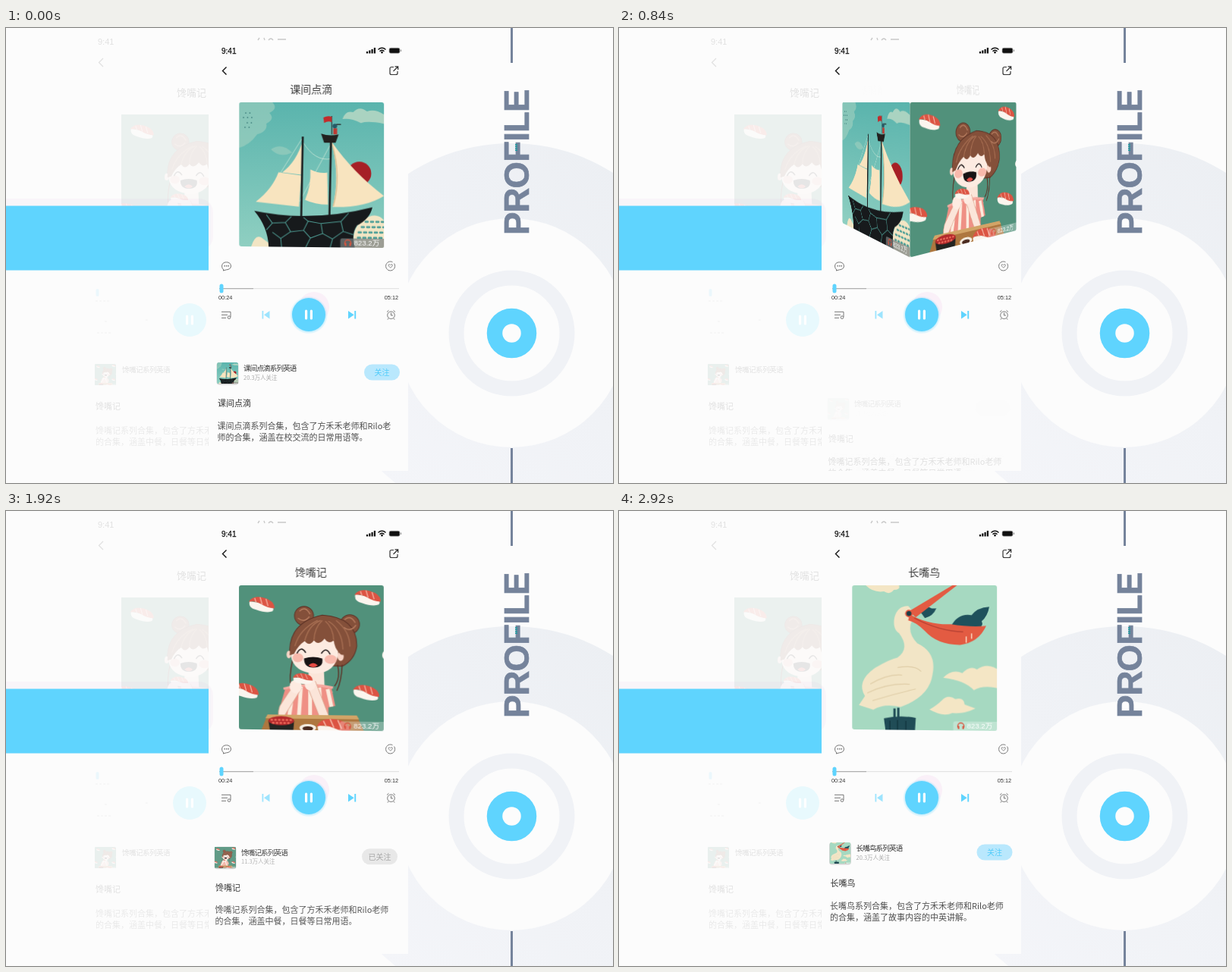
An HTML page that plays this animation: 800x600 px, repeating every 2960 ms.

```html
<!DOCTYPE html>
<html lang="zh-CN">
<head>
<meta charset="utf-8">
<title>Player</title>
<style>
  html, body { margin: 0; width: 100%; height: 100%; overflow: hidden; background: #fcfcfc; }
  #stage { position: relative; width: 800px; height: 600px; overflow: hidden; }
  #scene { position: absolute; left: 0; top: 0; }
  text, .title { font-family: "Noto Sans CJK SC", "Noto Sans CJK", "Noto Sans", sans-serif; }
  .latin { font-family: "Liberation Sans", Arial, sans-serif; }
  #cube { position: absolute; inset: 0; perspective: 573px; perspective-origin: 405px 99px; }
  .face { position: absolute; left: 309.5px; top: 98px; width: 191px; height: 191px; backface-visibility: hidden; }
  .face svg { display: block; border-radius: 3px; }
  .title { position: absolute; top: -26px; width: 100%; text-align: center; font-size: 14px; line-height: 17px; font-weight: 400; color: #3c3c3c; }
  .thumb { clip-path: inset(0 round 3px); }
</style>
</head>
<body>
<div id="stage">
<svg id="scene" width="800" height="600" viewBox="0 0 800 600">
  <defs>
    <linearGradient id="disc" x1="1" y1="0" x2="0" y2="1">
      <stop offset="0" stop-color="#ebeef2"/><stop offset="1" stop-color="#f5f6fa"/>
    </linearGradient>
    <linearGradient id="sky" x1="0" y1="0" x2="0" y2="1">
      <stop offset="0" stop-color="#5ab4ad"/><stop offset="1" stop-color="#8fcfc1"/>
    </linearGradient>
    <radialGradient id="glow"><stop offset=".85" stop-color="#5fd4fe" stop-opacity=".4"/><stop offset="1" stop-color="#5fd4fe" stop-opacity="0"/></radialGradient>
    <clipPath id="leftClip"><rect width="267" height="600"/></clipPath>
    <clipPath id="phoneClip"><rect x="267" width="263" height="584"/></clipPath>

    <g id="tag">
      <path d="M133 190V181Q133 178 136 178H190V190Z" fill="#fff" opacity=".28"/>
      <path d="M139 186V184A4 4 0 0 1 147 184V186" fill="none" stroke="#d9553f" stroke-width="1.4"/>
      <path d="M139 184h2v4h-2zM145 184h2v4h-2z" fill="#d9553f"/>
      <text x="151" y="187.5" font-size="9.5" fill="#fff" class="latin">823.2万</text>
    </g>
    <g id="sushi">
      <path d="M-16 0Q-17 9-6 10Q9 13 16 9Q19 4 10 1Z" fill="#fbf5ee"/>
      <path d="M-17 1Q-13-9 2-7T18 5Q9 6 0 2T-17 1Z" fill="#dc5443"/>
      <path d="M-10-5l3 6M-3-7l4 9M5-6l4 9" stroke="#f6b9a8" stroke-width="1.2" fill="none"/>
    </g>
    <g id="pause"><circle r="22"/><path d="M-3.4-5V5M3.4-5V5" stroke="#fff" stroke-width="3.2" stroke-linecap="round"/></g>

    <symbol id="art0" viewBox="0 0 190 190">
      <rect width="190" height="190" fill="url(#sky)"/>
      <g fill="#aad3c1">
        <path d="M0 0H44Q52 8 40 14Q48 22 36 28Q38 38 24 42Q14 56 0 60Z" opacity=".55"/>
        <path d="M136 22Q140 10 150 13Q158 4 168 12Q178 8 190 16V28Q170 24 160 27Q146 20 136 22Z"/>
        <path d="M42 62Q56 52 70 66Q54 74 42 62Z" opacity=".5"/>
      </g>
      <path d="M8 14h9M5 20h14M10 27h10M7 33h8" stroke="#2b6d6d" stroke-width="1.2" stroke-dasharray="1.5 4"/>
      <circle cx="158" cy="93" r="15.5" fill="#a61f26"/>
      <path d="M84 52Q100 78 121 74M84 46L40 116M121 54L80 130" fill="none" stroke="#cfe9d8" stroke-width=".7"/>
      <g fill="#f8e4bf">
        <path d="M84 50Q76 78 57 92L82 95Z"/>
        <path d="M52 92L82 96L79 137L22 131Q44 114 52 92Z"/>
        <path d="M94 88Q106 94 116 92L117 134Q100 134 87 128Q95 110 94 88Z"/>
        <path d="M122 52Q150 92 190 122Q165 138 123 137Q133 100 122 52Z"/>
      </g>
      <path d="M122 53Q135 96 124 136" stroke="#d8bf94" stroke-width="1.5" fill="none"/>
      <g fill="#f2e5c4">
        <path d="M152 190Q146 166 164 153Q180 142 190 154V190Z"/>
        <path d="M16 190Q22 171 32 180L46 190Z"/>
      </g>
      <path d="M166 156H190M161 163H190M157 170H190M156 177H190" stroke="#4d9f98" stroke-width="2.6" stroke-dasharray="3 4" stroke-linecap="round"/>
      <path d="M84 45L82 150M121 50L119 148" stroke="#1b1d1e" stroke-width="2.6"/>
      <path d="M20 143Q96 158 175 137Q172 152 155 161Q147 172 152 190H39Q38 164 20 143Z" fill="#171a1c"/>
      <path d="M36 148l8 11l-8 9M44 159l17-1l8-8M61 158l7 12l-13 9l-11-8M68 170l17-2l6-12l-6-5M85 168l9 10l-6 12M94 178l16-6l-2-13l-17-3M110 172l13 7l-3 11M123 179l14-10l-3-13l-26 3M134 156l10-11M137 169l13 4M55 179l1 11" fill="none" stroke="#4f9f96" stroke-width="1"/>
      <path d="M108 41Q119 45 131 42L127 53H112Z" fill="#22211f"/>
      <path d="M122 18V42" stroke="#26282a"/>
      <path d="M111 20Q117 17 122 19V26Q117 24 112 27Z" fill="#c22c2b"/>
      <circle cx="126" cy="31" r="3" fill="#245a68"/><path d="M124 34h5v8h-5z" fill="#bd3932"/><path d="M128 29h6" stroke="#222" stroke-width="1.3"/>
      <rect x="134" y="178" width="56" height="12" fill="#26302f" opacity=".6"/>
      <use href="#tag"/>
    </symbol>

    <symbol id="art1" viewBox="0 0 190 190">
      <rect width="190" height="190" fill="#51917b"/>
      <use href="#sushi" transform="translate(30 23) rotate(8)"/>
      <use href="#sushi" transform="translate(169 14) rotate(8)"/>
      <use href="#sushi" transform="translate(9 137) rotate(8)"/>
      <use href="#sushi" transform="translate(167 138) rotate(8)"/>
      <ellipse cx="191" cy="91" rx="3" ry="5" fill="#fbf5ee"/>
      <g fill="#84503a" stroke="#5b3024">
        <circle cx="86" cy="40" r="12.5"/><circle cx="146" cy="51" r="12.5"/>
        <path d="M67 86Q68 48 110 39Q156 42 155 80Q152 98 136 106L80 104Z"/>
      </g>
      <path d="M80 34q8-8 14 4M78 43q8 7 15-2M139 45q8-7 14 4M138 55q9 7 16-3" fill="none" stroke="#b57b5e" stroke-width="1.5"/>
      <path d="M71 98Q66 120 69 134M130 104Q134 122 126 132M136 104Q135 126 129 138" fill="none" stroke="#5b3024" stroke-width="1.4"/>
      <path d="M92 108H112L113 134L124 140L112 150H82L73 138L92 132Z" fill="#fbe5d9"/>
      <path d="M69 88Q74 62 99 64Q130 64 131 90Q127 114 101 116Q73 114 69 94Z" fill="#fdebe1"/>
      <ellipse cx="66" cy="91" rx="3" ry="5" fill="#f8d5c7"/><ellipse cx="134" cy="93" rx="4" ry="6" fill="#f8d5c7"/>
      <path d="M67 92Q68 52 106 44Q150 46 143 90Q134 93 132 88Q126 82 125 72Q118 78 113 70Q105 80 99 72Q93 81 87 73Q78 79 73 90Z" fill="#84503a"/>
      <path d="M108 46Q92 52 87 73M110 46Q100 55 99 72M114 47Q124 55 125 72M118 47Q136 58 137 84M104 46Q80 58 74 80M128 46Q146 60 146 80" fill="none" stroke="#a66d51" stroke-width="1.4"/>
      <ellipse cx="78" cy="95" rx="7" ry="6" fill="#f7a89b" opacity=".75"/><ellipse cx="121" cy="97" rx="8" ry="6" fill="#f7a89b" opacity=".75"/>
      <path d="M77 89Q82 79 88 88M109 89Q115 80 120 90" fill="none" stroke="#272020" stroke-width="1.6" stroke-linecap="round"/>
      <path d="M86 96Q98 92 110 96Q112 108 98 108Q86 108 86 96Z" fill="#171314"/><path d="M92 105Q98 99 104 105Q98 110 92 105Z" fill="#e34b45"/>
      <path d="M61 137Q90 126 122 134L127 158L118 160V176H58L55 158Z" fill="#ef9085"/>
      <path d="M72 134L66 176M82 133L79 176M94 132V176M106 134L109 176M117 136L122 159" stroke="#fcebdd" stroke-width="5"/>
      <path d="M59 136Q90 127 124 134" stroke="#f6aaa0" stroke-width="3" fill="none"/>
      <path d="M54 159Q50 171 55 180L83 135L75 128Q66 140 54 159ZM91 134L109 179L120 175L101 126Z" fill="#fbe5d9" stroke="#d89c84" stroke-width=".8"/>
      <ellipse cx="75" cy="133" rx="8" ry="9" fill="#fdebe1"/><ellipse cx="94" cy="130" rx="7" ry="8" fill="#fdebe1"/>
      <use href="#sushi" transform="translate(84 121) scale(.75)"/>
      <path d="M30 190L38 170H155L164 190Z" fill="#ae773f"/><path d="M38 170H155L158 175H35Z" fill="#d2a467"/>
      <path d="M39 178H73L72 190H41Z" fill="#242522"/><ellipse cx="56" cy="178" rx="17" ry="6" fill="#b3292b"/>
      <path d="M43 177H70M45 181H67" stroke="#ee6b5b" stroke-width="2.5" stroke-dasharray="1 4" stroke-linecap="round"/>
      <ellipse cx="91" cy="187" rx="11" ry="5" fill="#f6eee2"/><ellipse cx="91" cy="188" rx="7" ry="3" fill="#4b2b20"/>
      <use href="#sushi" transform="translate(124 184) scale(1.25)"/>
      <use href="#tag"/>
    </symbol>

    <symbol id="art2" viewBox="0 0 190 190">
      <rect width="190" height="190" fill="#a6d9c1"/>
      <g fill="#f4e6c5">
        <path d="M18 0H62Q64 6 55 6Q50 13 42 8Q28 10 18 0Z"/>
        <path d="M120 121Q132 109 145 115Q155 104 164 110Q176 101 190 109V134Q172 130 160 137Q148 124 120 121Z"/>
        <path d="M102 163Q112 157 118 151Q126 142 136 149Q147 146 148 156L162 161Q146 169 132 167Q120 173 102 163Z"/>
      </g>
      <path d="M56 42Q60 27 74 27Q82 34 79 46Q72 62 86 76Q112 88 106 117Q102 146 64 160Q42 155 28 164L9 158L17 146Q5 127 30 109Q50 97 60 95Q77 83 62 63Q53 57 56 42Z" fill="#f2e5c6"/>
      <path d="M24 130Q48 116 66 118M20 142Q48 128 76 130M27 152Q55 143 84 136M60 108Q83 104 91 113" fill="none" stroke="#dfcda7" stroke-width="1.2"/>
      <path d="M56 162V174M61 161V174" stroke="#204c56" stroke-width="3"/>
      <path d="M42 175Q62 170 84 174L83 190H44Z" fill="#204c56"/><path d="M50 178v12M60 177v13M71 178v12" stroke="#12363f" stroke-width="1.5"/>
      <path d="M88 32Q97 34 98 25Q103 32 111 30Q107 40 96 43Z" fill="#1f515c"/>
      <path d="M75 34L132 0H138L84 42Z" fill="#e35b42"/>
      <path d="M130 54Q139 36 157 39Q164 29 180 28Q178 40 170 47Q174 54 162 57L143 65Z" fill="#1f515c"/>
      <path d="M76 38Q100 52 130 51Q156 55 176 53Q166 75 142 78Q112 78 96 60Q84 48 74 46Z" fill="#e35b42"/>
      <path d="M82 43Q114 60 146 61" fill="none" stroke="#ba4334" stroke-width="1.4"/>
      <path d="M150 67v8M157 63v7" stroke="#fff3de" stroke-width="1.2"/>
      <circle cx="75" cy="37" r="5" fill="#e35b42"/><circle cx="75" cy="37" r="3.2" fill="#1d3d45"/>
      <use href="#tag"/>
    </symbol>
  </defs>

  <rect width="800" height="600" fill="#fcfcfc"/>
  <circle cx="666" cy="402" r="250" fill="url(#disc)"/>
  <circle cx="666" cy="402" r="151" fill="#fcfcfc"/>
  <circle cx="666.5" cy="402.5" r="73" fill="none" stroke="#f0f2f6" stroke-width="20"/>
  <circle cx="666.5" cy="402.5" r="22.5" fill="none" stroke="#5fd4fe" stroke-width="20.5"/>
  <path d="M666.5 0V46M666.5 554V600" stroke="#75839b" stroke-width="3"/>
  <text class="latin" transform="translate(689 273) rotate(-90)" font-size="45.5" font-weight="700" letter-spacing="-.8" fill="#75839b" stroke="#75839b" stroke-width=".7">PROFILE</text>
  <path d="M672.5 153V163" stroke="#1e9aa0" stroke-width="3" stroke-dasharray="1.5 1"/>
  <rect x="267" width="263" height="584" fill="#fcfcfc"/>

  <rect x="-20" y="225" width="293" height="68" rx="18" fill="#f9f5f9"/>
  <g clip-path="url(#leftClip)">
    <use href="#art1" x="152" y="114" width="172" height="172" opacity=".09"/>
    <g opacity=".1">
      <text x="121" y="22" font-size="11" class="latin">9:41</text>
      <path d="M128 40L122.5 45.5L128 51" fill="none" stroke="#000" stroke-width="1.3"/>
      <text x="225" y="90" font-size="13">馋嘴记</text>
      <text x="153" y="454" font-size="9.6" letter-spacing="-.6">馋嘴记系列英语</text>
      <text x="118" y="503" font-size="11">馋嘴记</text>
      <use href="#art1" class="thumb" x="117" y="443" width="28" height="28"/>
      <rect x="118.5" y="344" width="4" height="10" rx="2" fill="#5fd4fe"/>
      <path d="M118 360H137M130 387h5M184 385h4M120 402h20" stroke="#333" stroke-dasharray="3 2" opacity=".5"/>
    </g>
    <g opacity=".07" font-size="11">
      <text x="118" y="535">馋嘴记系列合集，包含了方禾禾</text>
      <text x="118" y="550">的合集，涵盖中餐，日餐等日常</text>
    </g>
    <use href="#pause" transform="translate(242 385)" fill="#e8f9fd"/>
    <rect y="234.5" width="267" height="85" fill="#5fd4fe"/>
  </g>

  <path d="M332 16l2-3M340 13l1 3M346 16q3-4 6 0M358 15h11" stroke="#c9c9c9" stroke-width="1.4" fill="none"/>
  <text x="284" y="34" class="latin" font-size="10" fill="#111" stroke="#111" stroke-width=".25">9:41</text>
  <path d="M476 33.5v-2.5M479.3 33.5v-4M482.6 33.5v-5.5M485.9 33.5v-7.5" stroke="#111" stroke-width="2.2"/>
  <path d="M490.5 28.5Q495.5 24 500.5 28.5M492.5 30.7Q495.5 28 498.5 30.7" fill="none" stroke="#111" stroke-width="1.5"/><circle cx="495.5" cy="32.3" r="1.2"/>
  <rect x="505" y="26.3" width="14" height="7" rx="2" fill="#111" stroke="#aaa" stroke-width=".7"/><path d="M520.5 28.5v2.5" stroke="#888"/>
  <path d="M290.5 51.5L285.5 56.5L290.5 61.5" fill="none" stroke="#111" stroke-width="1.4"/>
  <path d="M511 51.5H508Q506 51.5 506 53.5V59.5Q506 61.5 508 61.5H514Q516 61.5 516 59.5V57M512.5 50.8H516.7V55M516.5 51L510.5 57" fill="none" stroke="#333" stroke-width="1.2"/>

  <g fill="none" stroke="#777">
    <path d="M287 319Q284.500 317 284.500 314Q285 308.800 290.500 308.800T296.500 314Q296 318.500 290.500 318.800L286 320Z"/>
    <path d="M287.500 313.800h1.500M290 313.800h1.500M292.500 313.800h1.500" stroke-width="1.4"/>
    <path d="M511.5 310.5A6 6 0 1 1 509.500 308.700"/>
    <path d="M506.700 316.300Q503 313.500 504.300 312Q505.700 311 506.700 312.600Q507.700 311 509.100 312Q510.400 313.500 506.700 316.300Z" stroke-width=".8"/>
    <path d="M284 374.300H296V381M284 378.300H292M284 382.300H290"/><circle cx="294" cy="381.600" r="1.800"/>
    <circle cx="507.500" cy="378.700" r="4.800"/><path d="M507.500 375.500V379H510M502 374.500L504.500 372.300M513 374.500L510.500 372.300M504 383l-1 1.500M511 383l1 1.500"/>
  </g>
  <path d="M281 343.7H518" stroke="#dedede"/><path d="M281 343.7H326" stroke="#a2a2a2"/>
  <rect x="281.5" y="337.5" width="5" height="12" rx="2.5" fill="#5fd4fe"/>
  <g font-size="7.3" fill="#333"><text class="latin" x="280" y="357.5">00:24</text><text class="latin" x="517" y="357.5" text-anchor="end">05:12</text></g>
  <circle cx="406" cy="368" r="20" fill="#faf0f8"/>
  <circle cx="399" cy="378.5" r="25" fill="url(#glow)"/>
  <use href="#pause" transform="translate(399 378)" fill="#5fd4fe"/>
  <path d="M347.5 373V383.5L340 378.2ZM337.5 373h1.8v10.5h-1.8Z" fill="#9de4fe"/>
  <path d="M451 373V383.5L458.7 378.2ZM459.3 373h1.9v10.5h-1.9Z" fill="#5fd4fe"/>
  <g id="panels" clip-path="url(#phoneClip)"></g>
</svg>
<div id="cube"></div>
</div>
<script>
const LOOP = 2960, STEP = 40, HALF = 95.5;

const turn = [[0, 2], [600, 32.5], [1080, 73.3], [1560, 89.8], [1620, 90.4], [1900, 92], [2200, 100.2], [2600, 151.6], [2920, 182]];

const stories = [
  { name: '课间点滴', x: 278, fans: '20.3', followed: false,
    lines: ['包含了方禾禾老师和Rilo老', '师的合集，涵盖在校交流的日常用语等。'],
    fade: [[0, 1], [600, .6], [850, 0]], drop: [[0, 5.5], [600, 33.5], [850, 48]] },
  { name: '馋嘴记', x: 275, fans: '11.3', followed: true,
    lines: ['包含了方禾禾老师和Rilo老师', '的合集，涵盖中餐，日餐等日常用语。'],
    fade: [[750, 0], [1080, .78], [1560, 1], [1700, 1], [2200, .76], [2430, 0]],
    drop: [[750, 55], [1080, 35], [1560, 0], [1700, 0], [2200, 26], [2430, 44]] },
  { name: '长嘴鸟', x: 277.5, fans: '20.3', followed: false,
    lines: ['包含了方禾禾老师和Rilo老师', '的合集，涵盖了故事内容的中英讲解。'],
    fade: [[2150, 0], [2200, .05], [2600, .92], [2920, 1]], drop: [[2150, 58], [2600, 22.5], [2920, 1.5]] }
];

// Monotone cubic interpolation through [time, value] keys, flat at both ends.
function curve(keys, t) {
  const last = keys.length - 1;
  if (t <= keys[0][0]) return keys[0][1];
  if (t >= keys[last][0]) return keys[last][1];
  const rate = i => (keys[i + 1][1] - keys[i][1]) / (keys[i + 1][0] - keys[i][0]);
  const slope = i => {
    if (i === 0 || i === last) return 0;
    const a = rate(i - 1), b = rate(i);
    return a * b > 0 ? 2 * a * b / (a + b) : 0;
  };
  const i = keys.findIndex(k => k[0] > t) - 1;
  const [t0, v0] = keys[i], [t1, v1] = keys[i + 1], span = t1 - t0, u = (t - t0) / span;
  const ease = u * u * (3 - 2 * u);
  return v0 + (v1 - v0) * ease + span * u * (1 - u) * (slope(i) * (1 - u) - slope(i + 1) * u);
}

// "data-fade" is the exponent that lets each part fade at its own rate.
function panelMarkup(s, i) {
  const [pill, ink, label] = s.followed ? ['#e5e5e5', '#999', '已关注'] : ['#b9e8fd', '#4fcbfa', '关注'];
  return `<g transform="translate(${s.x} 0)">
    <g data-fade="1.8">
      <rect x="-.5" y="435.5" width="29" height="29.5" rx="4" fill="#777" opacity=".3"/>
      <use href="#art${i}" class="thumb" y="435.5" width="28" height="28"/>
    </g>
    <text data-fade="1.2" x="35" y="446.3" font-size="9.6" font-weight="500" letter-spacing="-.9" fill="#333">${s.name}系列英语</text>
    <text data-fade="2.5" x="35" y="458.2" font-size="7.5" fill="#aaa">${s.fans}万人关注</text>
    <g data-fade="3">
      <rect x="194" y="438" width="47" height="21" rx="10.5" fill="${pill}"/>
      <text x="217.5" y="452.3" font-size="10" text-anchor="middle" fill="${ink}">${label}</text>
    </g>
    <text data-fade="1.1" x="1" y="493.8" font-size="11" fill="#333">${s.name}</text>
    <g data-fade=".9" font-size="11" fill="#505050">
      <text x=".5" y="523">${s.name}系列合集，${s.lines[0]}</text>
      <text x=".5" y="538">${s.lines[1]}</text>
    </g></g>`;
}

const panels = document.getElementById('panels');
const cube = document.getElementById('cube');
stories.forEach((s, i) => {
  s.panel = document.createElementNS('http://www.w3.org/2000/svg', 'g');
  s.panel.innerHTML = panelMarkup(s, i);
  panels.append(s.panel);
  s.parts = [...s.panel.querySelectorAll('[data-fade]')];
  s.face = document.createElement('div');
  s.face.className = 'face';
  s.face.innerHTML = `<svg width="191" height="191"><use href="#art${i}" width="191" height="191"/></svg><div class="title">${s.name}</div>`;
  s.title = s.face.lastChild;
  cube.append(s.face);
});

function draw(t) {
  const angle = curve(turn, t);
  stories.forEach((s, i) => {
    const shown = curve(s.fade, t);
    s.face.style.transform = `translateZ(${-HALF}px) rotateY(${i * 90 - angle}deg) translateZ(${HALF}px)`;
    s.title.style.opacity = shown;
    s.panel.setAttribute('transform', `translate(0 ${curve(s.drop, t)})`);
    s.panel.style.display = shown > 0 ? '' : 'none';
    s.parts.forEach(p => p.setAttribute('opacity', shown ** p.dataset.fade));
  });
}

const start = performance.now();
function tick() {
  const t = (performance.now() - start) % LOOP;
  draw(Math.floor(t / STEP) * STEP);
  requestAnimationFrame(tick);
}
tick();
</script>
</body>
</html>
```
